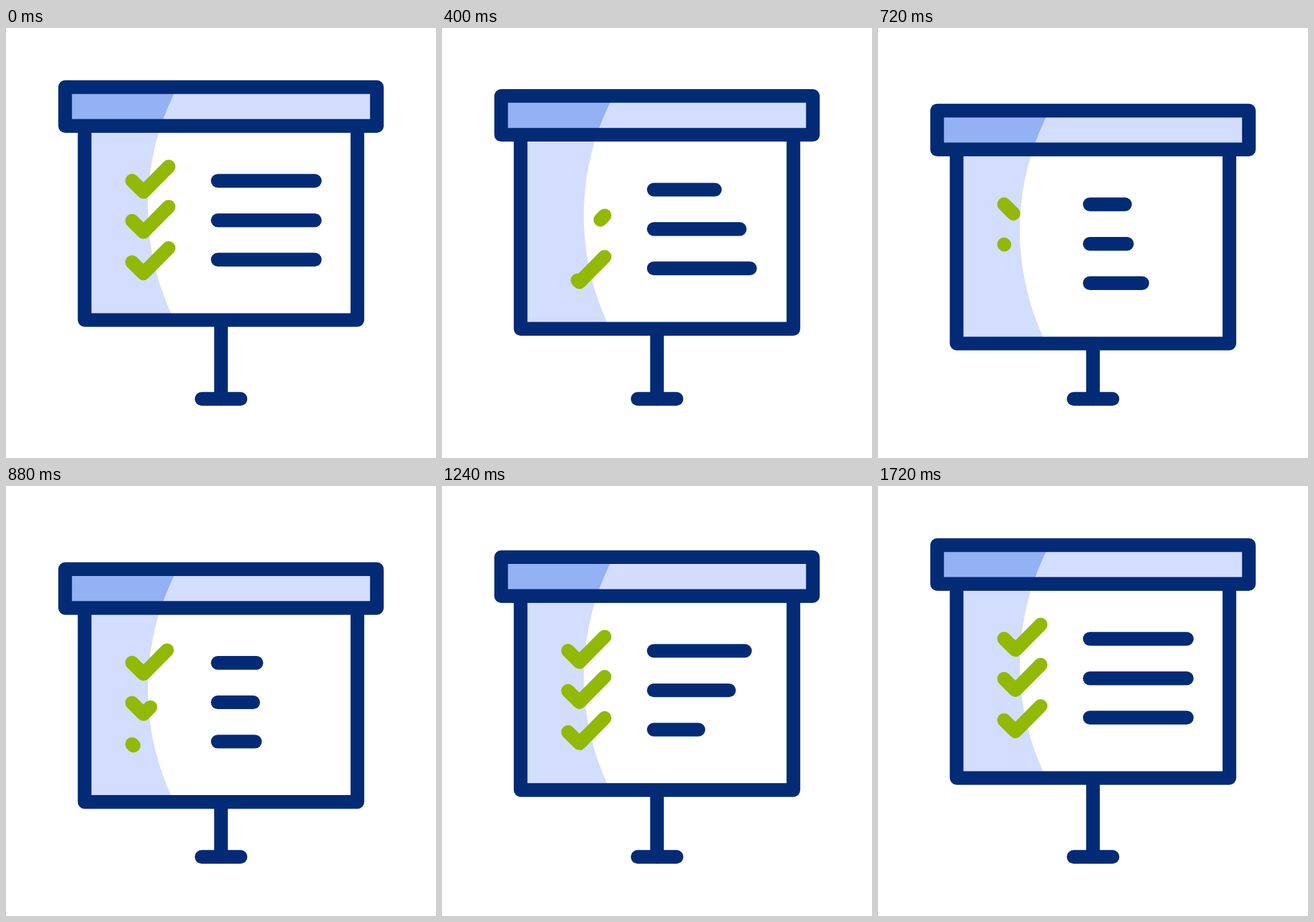
These frames come from a looping animation (640x640 px, 2 s). An HTML page with a canvas:

```html
<!DOCTYPE html>
<html lang="en">
<head>
<meta charset="utf-8">
<title>Checklist board</title>
<style>
  html, body { margin: 0; width: 100%; height: 100%; overflow: hidden; background: #fff; }
  canvas { display: block; width: 100vmin; height: 100vmin; }
</style>
</head>
<body>
<canvas id="stage" width="640" height="640"></canvas>
<script>
const ctx = document.getElementById('stage').getContext('2d');
const LOOP = 2000, STEP = 40;
const NAVY = '#032b75', PALE = '#d3ddfd', MID = '#93b1f3', GREEN = '#91b906';
const DROP = 35.8;

// Symmetric cubic ease: bezier (0.64, 0, 0.36, 1), solved by bisection.
function ease(x) {
  if (x <= 0) return 0;
  if (x >= 1) return 1;
  let lo = 0, hi = 1;
  for (let i = 0; i < 24; i++) {
    const s = (lo + hi) / 2, r = 1 - s;
    if (3 * r * r * s * 0.64 + 3 * r * s * s * 0.36 + s * s * s < x) lo = s;
    else hi = s;
  }
  return lo * lo * (3 - 2 * lo);
}

const ramp = (t, from, to) => ease((t - from) / (to - from));
const thereAndBack = (t, a, b, c) => ramp(t, a, b) - ramp(t, b, c);

function stroke(points, color = NAVY, closed = false) {
  ctx.beginPath();
  points.forEach(([x, y]) => ctx.lineTo(x, y));
  if (closed) ctx.closePath();
  ctx.strokeStyle = color;
  ctx.stroke();
}

function box(x, y, w, h, color) {
  ctx.fillStyle = color;
  ctx.fillRect(x, y, w, h);
}

// Paints the part of a box that lies left of the large circle.
function shade(x, y, w, h, color) {
  ctx.save();
  ctx.beginPath();
  ctx.rect(x, y, w, h);
  ctx.clip();
  ctx.beginPath();
  ctx.rect(0, 0, 592, 640);
  ctx.arc(592, 266, 381, 0, Math.PI * 2);
  ctx.fillStyle = color;
  ctx.fill('evenodd');
  ctx.restore();
}

// Draws the check between two fractions of its length.
function check(y, from, to) {
  if (to - from < 1e-4) return;
  const a = [187.6, y], b = [204.6, y + 16.8], c = [242, y - 21];
  const first = Math.hypot(b[0] - a[0], b[1] - a[1]);
  const second = Math.hypot(c[0] - b[0], c[1] - b[1]);
  const bend = first / (first + second);
  const mix = (p, q, k) => [p[0] + (q[0] - p[0]) * k, p[1] + (q[1] - p[1]) * k];
  const at = f => f < bend ? mix(a, b, f / bend) : mix(b, c, (f - bend) / (1 - bend));
  const points = [at(from)];
  if (from < bend && to > bend) points.push(b);
  points.push(at(to));
  stroke(points, GREEN);
}

function draw(t) {
  box(0, 0, 640, 640, '#fff');
  ctx.lineWidth = 20.4;
  ctx.lineCap = ctx.lineJoin = 'round';

  stroke([[320, 430], [320, 552]]);
  stroke([[291.2, 552], [349, 552]]);

  ctx.save();
  ctx.translate(0, DROP * thereAndBack(t, 40, 840, 1640));

  box(117, 146, 406, 288.6, '#fff');
  shade(117, 146, 406, 288.6, PALE);
  stroke([[117, 146], [117, 434.6], [523, 434.6], [523, 146]]);

  box(88, 88, 464, 57.8, PALE);
  shade(88, 88, 464, 57.8, MID);
  stroke([[88, 88], [552, 88], [552, 145.8], [88, 145.8]], NAVY, true);

  [[227.5, 40], [286.2, 160], [344.7, 320]].forEach(([y, start]) => {
    const cut = 92 * thereAndBack(t, start, start + 680, start + 1400);
    stroke([[315.2, y], [459.6 - cut, y]]);
  });

  [227.3, 287, 348.4].forEach((y, i) => {
    const out = i * 120, back = out + 560;
    if (t < back) check(y, ramp(t, out, out + 400), 1);
    else check(y, 0, ramp(t, back, back + 400));
  });
  ctx.restore();
}

function tick() {
  draw(Math.floor(performance.now() % LOOP / STEP) * STEP);
  requestAnimationFrame(tick);
}
tick();
</script>
</body>
</html>
```
